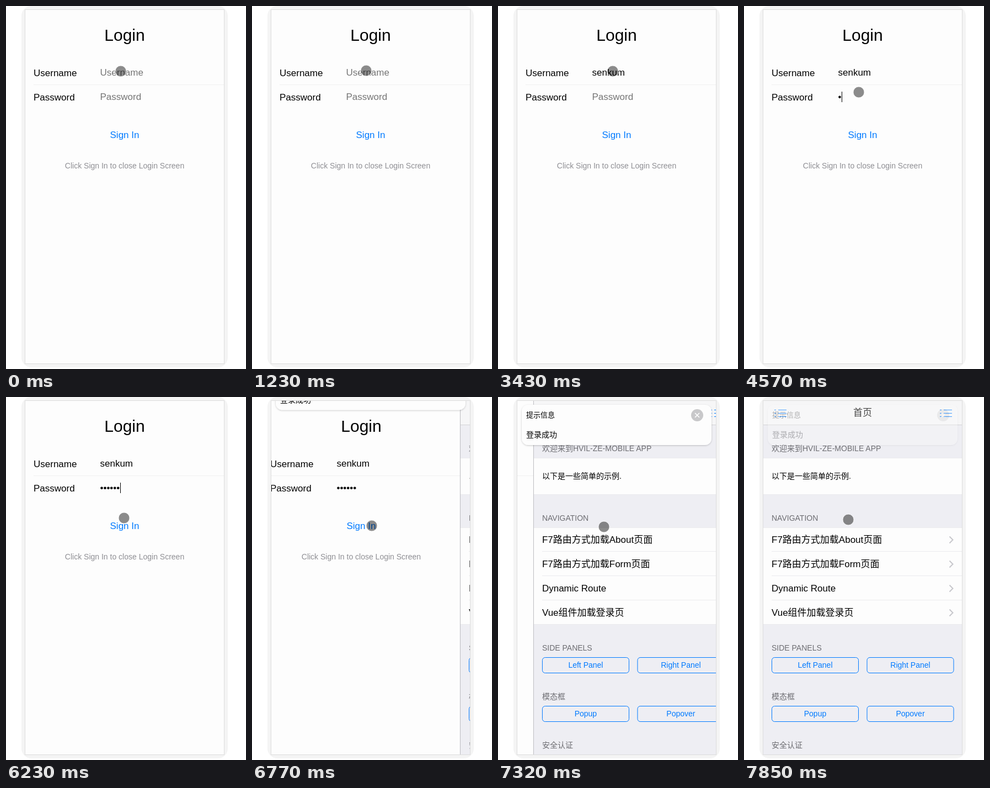
Write an HTML page that moves like this. It is 435 px wide and 657 px high and loops after 8000 ms.

```html
<!DOCTYPE html>
<html lang="zh-CN">
<head>
<meta charset="utf-8">
<title>Login</title>
<style>
  html, body { margin: 0; width: 100%; height: 100%; overflow: hidden; background: #fff; }
  svg { display: block; font: 17px "Liberation Sans", "Noto Sans CJK SC", sans-serif; }
  text { white-space: pre; }
  .mid { text-anchor: middle; }
  .small { font-size: 14px; }
  .blue { fill: #007aff; }
  .hint { fill: #757575; }
  .head { font-size: 14px; fill: #6d6d72; }
  .ime { font-size: 16px; fill: #1585d3; }
  .mono { font-family: "Liberation Mono", monospace; font-size: 13.33px; }
  .first { fill: #d22; }
</style>
</head>
<body>
<svg width="435" height="657" viewBox="0 0 435 657">
  <defs>
    <clipPath id="screen"><rect x="35" y="7" width="360" height="640"/></clipPath>
    <filter id="soft" x="-10%" y="-20%" width="120%" height="150%">
      <feDropShadow dx="0" dy="1" stdDeviation="1.5" flood-opacity=".22"/>
    </filter>
    <g id="menu" stroke="#007aff">
      <path d="M0 23.5h3M0 29.5h3M0 35.5h3M7 23.5h15M7 29.5h15M7 35.5h15"/>
    </g>
  </defs>

  <rect x="28" y="0" width="374" height="654" rx="18" fill="#f4f4f4"/>
  <rect x="34.5" y="6.5" width="361" height="641" fill="#fdfdfd" stroke="#dcdcdc"/>

  <g clip-path="url(#screen)">
    <g id="login">
      <text class="mid" x="215" y="63" font-size="30">Login</text>
      <text x="50" y="127">Username</text>
      <text x="50" y="171">Password</text>
      <path d="M50 142.5H395" stroke="#f1f1f1"/>
      <text id="user" x="170.5" y="126"></text>
      <text id="pass" x="170.5" y="170"></text>
      <text class="mid blue" x="215" y="239">Sign In</text>
      <text class="mid small" x="215" y="294" fill="#8f8f94">Click Sign In to close Login Screen</text>
      <rect id="caret" width="1" height="19"/>
    </g>

    <g id="home">
      <rect x="35" y="7" width="360" height="640" fill="#eeeef3"/>
      <rect x="35" y="7" width="360" height="43" fill="#f6f6f7"/>
      <path d="M35 50.5H395" stroke="#d4d4d6"/>
      <use href="#menu" x="55"/>
      <use href="#menu" x="355"/>
      <text class="mid" x="215" y="34">首页</text>
      <text class="head" x="50" y="98">欢迎来到HVIL-ZE-MOBILE APP</text>
      <rect x="35" y="111" width="360" height="65" fill="#fdfdfd"/>
      <text class="small" x="50" y="148">以下是一些简单的示例.</text>
      <text class="head" x="50" y="224">NAVIGATION</text>
      <rect x="35" y="237" width="360" height="174" fill="#fdfdfd"/>
      <path d="M35 110.5H395M35 176.5H395M35 236.5H395M50 279.5H395M50 323.5H395M50 367.5H395M35 411.5H395" stroke="#ebebee"/>
      <g id="rows"></g>
      <text class="head" x="50" y="459">SIDE PANELS</text>
      <text class="head" x="50" y="547">模态框</text>
      <text class="head" x="50" y="635">安全认证</text>
      <g id="buttons"></g>
      <path d="M34.5 7V647" stroke="#bcbcc0"/>
    </g>

    <g id="notice">
      <rect x="43" y="14" width="344" height="73" rx="12" fill="#fdfdfd" filter="url(#soft)"/>
      <text x="51" y="36.5" font-size="13">提示信息</text>
      <text class="small" x="51" y="73">登录成功</text>
      <circle cx="361" cy="33" r="11" fill="#c8c8ca"/>
      <path d="M357 29l8 8M365 29l-8 8" stroke="#fff" stroke-width="1.6"/>
    </g>
  </g>

  <g id="ime">
    <rect x="170.5" y="131.5" width="300" height="55" fill="#fdfefe" stroke="#a9c6d2"/>
    <path d="M171 158.5H435" stroke="#d3e0e5"/>
    <text id="typed" x="181" y="151" font-size="16" font-weight="bold" fill="#0a5cc4"></text>
    <rect id="imeCaret" y="136" width="1" height="19" fill="#235"/>
    <text id="choices" class="ime" x="181" y="178"></text>
  </g>

  <circle id="cursor" r="10" fill="#000" fill-opacity=".45" stroke="#fff" stroke-opacity=".75"/>
</svg>
<script>
const LOOP = 8000;
const $ = id => document.getElementById(id);
const show = (el, on) => el.setAttribute('visibility', on ? 'visible' : 'hidden');
const move = (el, x, y) => el.setAttribute('transform', `translate(${x} ${y})`);
const clamp = v => Math.max(0, Math.min(1, v));

// Last entry of a [time, ...values] list that has started
const latest = (list, t) => list.findLast(entry => entry[0] <= t);
const within = (t, from, to) => t >= from && t < to;

// CSS "ease": cubic-bezier(.25, .1, .25, 1)
function ease(x) {
  if (x <= 0 || x >= 1) return clamp(x);
  const bezier = (u, a, b) => 3 * a * u * (1 - u) ** 2 + 3 * b * u * u * (1 - u) + u ** 3;
  let low = 0, high = 1;
  for (let i = 0; i < 20; i++) {
    const u = (low + high) / 2;
    if (bezier(u, .25, .25) < x) low = u; else high = u;
  }
  return bezier(low, .1, 1);
}

const path = [
  [0, 208, 118], [280, 209, 118], [400, 207, 117], [2640, 208, 118],
  [4300, 208, 132], [4420, 208, 147], [4570, 208, 156],
  [5990, 208, 159], [6110, 211, 190], [6230, 214, 219],
  [6380, 218, 229], [6500, 219, 233], [6620, 217, 233],
  [7160, 208, 236], [7320, 192, 235], [7460, 189, 231], [7580, 189, 226], [7730, 189, 222]
];
const composing = [[0, ''], [1760, 's'], [1880, 'se'], [2160, 'sen'], [2280, 'senk'], [2520, '']];
const username = [[0, ''], [2520, 'senk'], [2790, 'senku'], [2910, 'senkum']];
const dotTimes = [4570, 4840, 5150, 5400, 5690, 5990];
const refresh = [0, 6770, 6920, 7040, 7160, 7320, 7460, 7580, 7730, 7850].map(t => [t]);
const words = {
  s: ['是的', '所以', '时候', '水'],
  se: ['色彩', '色泽', '塞外', '色'],
  sen: ['森林', '森然', '森严', '森'],
  senk: ['森口', '森开', '森可', '森']
};

$('rows').innerHTML = ['F7路由方式加载About页面', 'F7路由方式加载Form页面', 'Dynamic Route', 'Vue组件加载登录页']
  .map((label, i) => `<text x="50" y="${264 + 44 * i}">${label}</text>
    <path d="M372.500 ${252.5 + 44 * i}l6 6l-6 6" fill="none" stroke="#c7c7cc" stroke-width="2"/>`).join('');

$('buttons').innerHTML = ['Left Panel', 'Right Panel', 'Popup', 'Popover'].map((label, i) => {
  const x = 50.5 + 172.5 * (i % 2), y = 471.5 + 88 * (i >> 1);
  return `<rect x="${x}" y="${y}" width="157" height="28" rx="5" fill="none" stroke="#007aff"/>
    <text class="mid small blue" x="${x + 78.5}" y="${y + 18.5}">${label}</text>`;
}).join('');

function setText(el, text, isHint) {
  if (el.textContent !== text) el.textContent = text;
  el.setAttribute('class', isHint ? 'hint' : '');
}

function drawIme(text) {
  show($('ime'), text);
  if (!text || $('typed').textContent === text) return;
  $('typed').textContent = text;
  $('imeCaret').setAttribute('x', Math.round(181 + $('typed').getComputedTextLength()));
  $('choices').innerHTML = `<tspan class="mono first">1.${text}</tspan>` + words[text]
    .map((word, i) => `<tspan class="mono" dx="13">${i + 2}.</tspan><tspan>${word}</tspan>`).join('');
}

function drawFields(t) {
  const name = latest(username, t)[1];
  const dots = dotTimes.filter(time => time <= t).length;
  setText($('user'), name || 'Username', !name);
  setText($('pass'), '•'.repeat(dots) || 'Password', !dots);

  const inPassword = t >= 4420;
  const x = inPassword ? 171 + 6 * dots
    : name ? Math.floor(171 + $('user').getComputedTextLength()) : 171;
  $('caret').setAttribute('x', x);
  $('caret').setAttribute('y', inPassword ? 155 : name ? 111 : 112);
  show($('caret'), within(t, 800, 1230) || within(t, 1760, 3430) || within(t, 3990, 6500));
}

function draw(t) {
  drawFields(t);
  drawIme(latest(composing, t)[1]);

  const [, x, y] = latest(path, t);
  move($('cursor'), x, y);

  const step = latest(refresh, t)[0];
  const slide = 360 * ease((step - 6710) / 936);
  move($('login'), -slide, 0);
  move($('home'), 360 - slide, 0);
  show($('home'), slide > 0);
  move($('notice'), 0, -90 * (1 - ease((step - 6680) / 450)));
  $('notice').setAttribute('opacity', 1 - clamp((step - 7690) / 220));
}

function loop(now) {
  draw(now % LOOP);
  requestAnimationFrame(loop);
}
requestAnimationFrame(loop);
</script>
</body>
</html>
```
